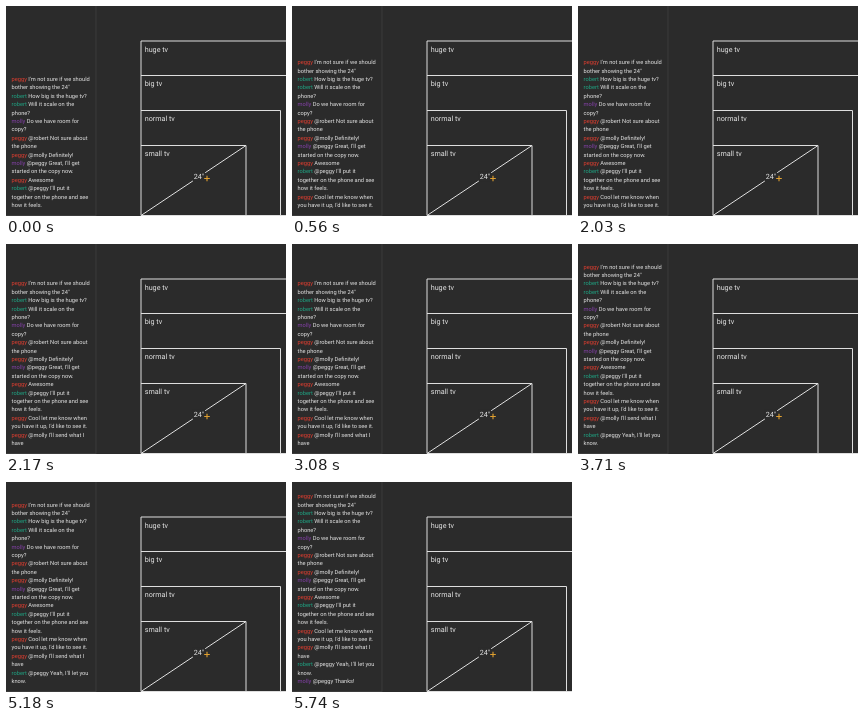
These frames come from a looping animation (280 by 210 pixels, 6.16 s). An HTML page:

```html
<!DOCTYPE html>
<html lang="en">
<head>
<meta charset="utf-8">
<title>TV size chat</title>
<style>
  html, body { margin: 0; width: 100%; height: 100%; overflow: hidden; background: #2b2b2b; }
  svg { display: block; width: 100%; height: 100%; }
  text { font-family: Roboto, Arial, sans-serif; fill: #e4e4e4; text-rendering: geometricPrecision; }
  #chat text { font-size: 5.7px; }
  #stage text { font-size: 7.2px; }
  .peggy { fill: #e03e30; }
  .robert { fill: #1fa483; }
  .molly { fill: #8440a8; }
  .outline { fill: none; stroke: #dedede; stroke-width: 1; }
</style>
</head>
<body>
<svg viewBox="0 0 280 210" xmlns="http://www.w3.org/2000/svg">
  <rect width="280" height="210" fill="#2b2b2b"/>
  <path d="M90 0V210M0 209.5H90" stroke="#414141" stroke-width=".8"/>
  <g id="chat"></g>
  <g id="stage">
    <g class="outline">
      <path d="M280 35H135V209.5H280M135 69.5H280"/>
      <path d="M135 104.5H274.5V209.5"/>
      <path d="M135 139.5H240V209.5"/>
      <path d="M135 209.5L240 139.5"/>
    </g>
    <text x="138.7" y="45.5">huge tv</text>
    <text x="138.7" y="80.3">big tv</text>
    <text x="138.7" y="115.3">normal tv</text>
    <text x="138.7" y="150.3">small tv</text>
    <rect x="186.8" y="165.5" width="12.4" height="10" fill="#2b2b2b"/>
    <text x="187.8" y="173">24″</text>
    <path d="M198.2 172.5H203.8M201 169.7V175.3" stroke="#e0a030" stroke-width="1.1"/>
  </g>
</svg>
<script>
  const LOOP = 6160, LINE = 8.4, LEFT = 5.6, BOTTOM = 201;

  // Each message: arrival time in ms, author, wrapped lines.
  const messages = [
    [0, "peggy", "I'm not sure if we should", "bother showing the 24″"],
    [0, "robert", "How big is the huge tv?"],
    [0, "robert", "Will it scale on the", "phone?"],
    [0, "molly", "Do we have room for", "copy?"],
    [0, "peggy", "@robert Not sure about", "the phone"],
    [0, "peggy", "@molly Definitely!"],
    [0, "molly", "@peggy Great, I'll get", "started on the copy now."],
    [0, "peggy", "Awesome"],
    [0, "robert", "@peggy I'll put it", "together on the phone and see", "how it feels."],
    [560, "peggy", "Cool let me know when", "you have it up, I'd like to see it."],
    [2100, "peggy", "@molly I'll send what I", "have"],
    [3710, "robert", "@peggy Yeah, I'll let you", "know."],
    [5250, "molly", "@peggy Thanks!"]
  ];

  const chat = document.getElementById("chat");

  function add(parent, tag, attrs, content = "") {
    const node = document.createElementNS("http://www.w3.org/2000/svg", tag);
    for (const key in attrs) node.setAttribute(key, attrs[key]);
    node.textContent = content;
    return parent.appendChild(node);
  }

  const rows = [];
  for (const [time, author, ...lines] of messages) {
    lines.forEach((line, i) => {
      const node = add(chat, "text", { x: LEFT, y: rows.length * LINE });
      if (i === 0) add(node, "tspan", { class: author }, author);
      node.append(i === 0 ? " " + line : line);
      rows.push({ time, node });
    });
  }

  // The log stays anchored to the bottom as messages arrive.
  function render(t) {
    const shown = rows.filter(row => row.time <= t).length;
    rows.forEach((row, i) => row.node.setAttribute("visibility", i < shown ? "visible" : "hidden"));
    chat.setAttribute("transform", `translate(0 ${BOTTOM - (shown - 1) * LINE})`);
  }

  const start = performance.now();
  function tick() {
    render((performance.now() - start) % LOOP);
    requestAnimationFrame(tick);
  }
  tick();
</script>
</body>
</html>
```
